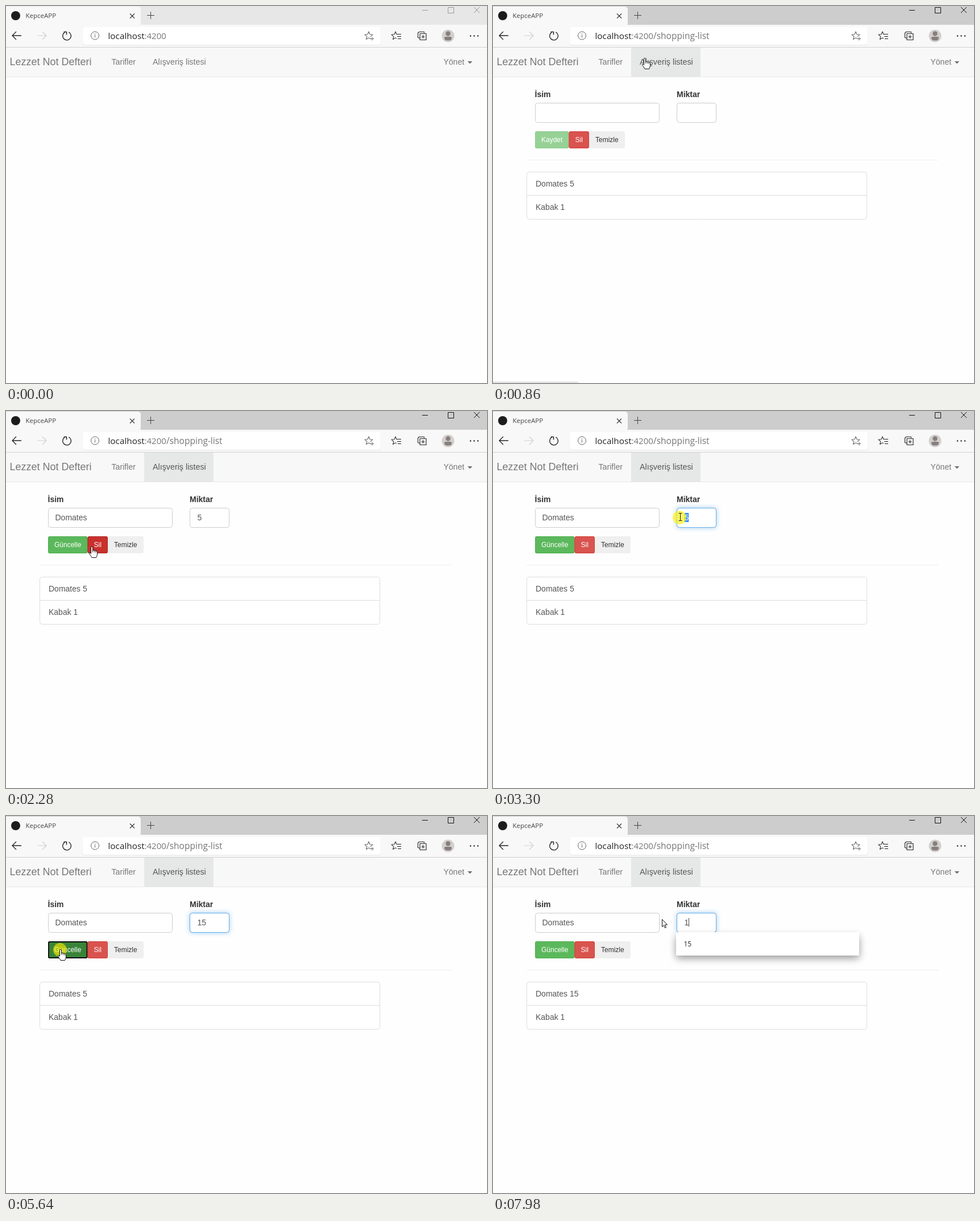
An HTML page with a canvas for the animation above (8000 ms loop, 846x662 px).

```html
<!DOCTYPE html>
<html lang="tr">
<head>
<meta charset="utf-8">
<title>KepceAPP</title>
<style>
html, body { margin: 0; width: 100%; height: 100%; overflow: hidden; background: #fefefe; }
canvas { display: block; }
</style>
</head>
<body>
<canvas id="stage" width="846" height="662"></canvas>
<script>
const c = document.getElementById('stage').getContext('2d');
const LOOP = 8000, TICK = 80;
const SANS = '"Liberation Sans", Arial, sans-serif';
const UI = '"Open Sans", "Noto Sans", sans-serif';

// Moments of the story, in ms
const ENTER = 70, NAV = 620, OPEN = 770, PICK = 2040, EDIT = 2120, FOCUS = 2930, TYPE1 = 4090,
  TYPE5 = 4230, SAVE = 5640, SAVED = 5720, REFOCUS = 7040, RETYPE = 7980;

// Pointer moves: start, end, x, y of the destination
const moves = [
  [ENTER, 390, 236, 84], [540, NAV, 267, 91], [950, 1330, 152, 236], [1420, 1570, 112, 336],
  [1570, 1720, 100, 302], [EDIT, 2200, 151, 238], [2360, 2840, 350, 183], [3090, 3390, 317, 187],
  [4720, 5320, 96, 234], [6420, 6740, 346, 183], [6890, 6890, 366, 183], [7120, 7350, 297, 181]
];
const presses = [[NAV, OPEN], [PICK, EDIT], [FOCUS, 3430], [SAVE, SAVED], [REFOCUS, 7300]];

const clamp = v => Math.max(0, Math.min(1, v));
const between = (t, a, b) => t >= a && t < b;

// The pointer advances once per tick while it moves.
function pointer(t) {
  let x = 690, y = 640;
  for (const [a, b, u, v] of moves) {
    if (t < a) break;
    const k = clamp((Math.floor((t - a) / TICK) + 1) * TICK / (b - a + TICK));
    x += (u - x) * k;
    y += (v - y) * k;
  }
  return { x: Math.round(x), y: Math.round(y) };
}

function text(s, x, y, color, size = 14, family = SANS, weight = '') {
  c.font = `${weight} ${size}px ${family}`;
  c.fillStyle = color;
  c.fillText(s, x, y);
}
function fill(color, x, y, w, h, r = 0) {
  c.fillStyle = color;
  c.beginPath();
  c.roundRect(x, y, w, h, r);
  c.fill();
}
// Border drawn just inside the box
function border(color, x, y, w, h, r = 0, lw = 1) {
  c.strokeStyle = color;
  c.lineWidth = lw;
  c.beginPath();
  c.roundRect(x + lw / 2, y + lw / 2, w - lw, h - lw, r);
  c.stroke();
}
function line(d, color, x = 0, y = 0, lw = 1, inside) {
  const p = new Path2D(d);
  c.save();
  c.translate(x, y);
  if (inside) { c.fillStyle = inside; c.fill(p); }
  c.strokeStyle = color;
  c.lineWidth = lw;
  c.lineJoin = 'round';
  c.stroke(p);
  c.restore();
}
function disc(color, x, y, r) {
  c.fillStyle = color;
  c.beginPath();
  c.arc(x, y, r, 0, 7);
  c.fill();
}
function star(x, y, r, color) {
  let d = '';
  for (let i = 0; i < 10; i++) {
    const a = i * Math.PI / 5, q = i % 2 ? r * .45 : r;
    d += (i ? 'L' : 'M') + q * Math.sin(a) + ' ' + -q * Math.cos(a);
  }
  line(d + 'Z', color, x, y, 1.1);
}

function browser(active, url) {
  fill(active ? '#cdcdcd' : '#e7e7e7', 0, 0, 846, 33);
  fill('#f8f8f8', 0, 33, 846, 39);
  fill('#f8f8f8', -8, 1, 245, 34, 5);
  fill('#d0d0d0', 0, 72, 846, 1);
  disc('#1c1c1c', 17, 17, 8);
  text('KepceAPP', 34.5, 21, '#444', 11.5, UI);
  line('M-4 -4l8 8m0 -8l-8 8', '#333', 222, 17.5, 1.1);
  line('M-6.5 0h13M0 -6.5v13', '#444', 254.5, 16.5);
  line('M732 7.5h10M777.5 2.5h10v10h-10zM823 2l10 10m0 -10l-10 10', active ? '#111' : '#999');

  line('M8 -7l-7 7 7 7M1 0h16', '#222', 10, 52, 1.3);
  line('M9 -7l7 7-7 7M16 0H0', '#d0d0d0', 55, 52, 1.2);
  line('M-4 -6.2A7.4 7.4 0 1 0 3.5 -6.6M-5.5 -7h5v5', '#222', 107, 52.5, 1.4);
  fill('#ececec', 134.5, 37.5, 525, 32, 4);
  fill('#fff', 135, 37, 524, 31, 4);
  line('M7 0A7 7 0 1 1 -7 0A7 7 0 1 1 7 0M0 -1.5v5M0 -4v1.4', '#666', 156.5, 52);
  text('localhost', 179.5, 58, '#222', 15.3, UI);
  text(':4200', 243.5, 58, '#757575', 15, UI);
  if (url) text(url, 282, 58, '#757575', 15.5, UI);

  star(638, 52.5, 7.5, '#666');
  fill('#fff', 641, 54, 7, 7);
  line('M0 -3v6M-3 0h6', '#666', 644, 57.5);
  star(685, 52.5, 7.5, '#333');
  fill('#f8f8f8', 687, 49, 8, 11);
  line('M0 0h8m-7 4h7m-6 4h6', '#222', 687, 49.5, 1.2);
  line('M3 11l-3 -1v-8l2 -2h9v2M3.5 3h11v11h-11zM9 5.5v6m-3 -3h6', '#222', 724.5, 45.5, 1.1);
  disc('#d2cfcd', 777.5, 52.5, 11);
  disc('#877f7e', 777.5, 48.5, 4.2);
  fill('#877f7e', 771, 54, 13, 6.5, [3, 3, 6, 6]);
  for (let i = 0; i < 3; i++) disc('#222', 817 + 6.5 * i, 52.5, 1.2);
}

function navbar(open, over) {
  fill('#f8f8f8', 0, 73, 846, 51);
  fill('#e7e7e7', 0, 124, 846, 1);
  if (open) fill('#e6e8e7', 243, 73, 122, 51);
  text('Lezzet Not Defteri', 6.5, 104, '#777', 18);
  text('Tarifler', 185.5, 103, over(171, 73, 72, 51) ? '#333' : '#777', 14.2);
  text('Alışveriş listesi', 258, 103, open ? '#555' : over(243, 73, 122, 51) ? '#333' : '#777', 14.3);
  text('Yönet', 769.5, 103, '#777');
  line('M0 0h7l-3.5 3.5z', '#777', 812.5, 97.5, 1, '#777');
}

function field(x, w, glow = 0) {
  c.save();
  c.shadowBlur = 8;
  c.shadowColor = `rgba(102,175,233,${.6 * glow})`;
  fill('#fff', x, 170, w, 35, 4);
  c.restore();
  border('#ccc', x, 170, w, 35, 4);
  c.globalAlpha = glow;
  border('#66afe9', x, 170, w, 35, 4);
  c.globalAlpha = 1;
}

function amount(t, at) {
  const left = 336.5, digit = 7.8;
  const focusedAt = t < SAVED ? FOCUS : REFOCUS;
  field(323, 70, t < focusedAt ? 0 : clamp((t - focusedAt + 60) / 150));
  if (t < EDIT) return;
  const value = t < TYPE1 ? '5' : t < TYPE5 || t >= RETYPE ? '1' : '15';
  const right = left + value.length * digit;
  text(value, left, 192, '#555');
  if (between(t, 3090, TYPE1) || between(t, 7120, RETYPE)) {
    const from = [...value].findIndex((_, i) => at.x < left + (i + .5) * digit);
    if (from < 0) return;
    const x = left + from * digit;
    fill('#3390ff', x, 179, right - x, 16);
    text(value.slice(from), x, 192, '#fff');
  } else if (between(t, FOCUS, 4720) || t >= REFOCUS) {
    fill('#444', Math.floor(right), 179, 1, 15);
  }
}

function button(label, x, w, color, edge, ink = '#fff') {
  fill(color, x, 220, w, 30, 3);
  border(edge, x, 220, w, 30, 3);
  text(label, x + 11, 239, ink, 12);
}

function form(t, over) {
  const editing = t >= EDIT;
  const split = editing ? 143.5 : 133.5, end = split + 35.5;
  const hot = (x, w) => over(x, 220, w, 30);
  const focused = between(t, SAVE, REFOCUS);
  if (!editing) button('Kaydet', 74, 59.5, '#96d196', '#8ccc8c');
  else if (between(t, SAVE, SAVED)) button('Güncelle', 74, 69.5, '#398439', '#255625');
  else if (focused || hot(74, 69)) button('Güncelle', 74, 69.5, '#449d44', '#398439');
  else button('Güncelle', 74, 69.5, '#5cb85c', '#4cae4c');
  if (focused) border('#111', 74, 220, 69.5, 30, 2, 2);
  if (hot(split, 35)) button('Sil', split, 35.5, '#c9302c', '#ac2925');
  else button('Sil', split, 35.5, '#d9534f', '#d43f3a');
  const gray = hot(end, 62) ? '#e5e5e5' : '#efefef';
  button('Temizle', end, 63, gray, gray, '#333');
}

function page(t, at, over) {
  text('İsim', 73.5, 160, '#333', 14, SANS, 'bold');
  text('Miktar', 323, 160, '#333', 14, SANS, 'bold');
  field(74, 219);
  if (t >= EDIT) text('Domates', 86.5, 192, '#555');
  amount(t, at);
  form(t, over);

  fill('#eee', 59, 270, 724, 1);
  fill('#fff', 59, 291, 599, 84, 4);
  border('#ddd', 59, 291, 599, 84, 4);
  fill('#ddd', 59, 332, 599, 1);
  text('Domates ' + (t < SAVED ? 5 : 15), 75, 317, '#555');
  text('Kabak 1', 75, 358, '#555');

  if (between(t, TYPE1, TYPE5) || t >= RETYPE) {
    c.save();
    c.shadowColor = 'rgba(0,0,0,.4)';
    c.shadowBlur = 14;
    c.shadowOffsetY = 5;
    fill('#fff', 322, 206, 322, 39, 3);
    c.restore();
    fill('#fff', 322, 204, 322, 41, 2);
    text('15', 335.5, 229, '#222', 12, UI);
  }
}

function cursor(t, at, over, open) {
  if (presses.some(([a, b]) => between(t, a, b))) disc('rgba(255,240,0,.62)', at.x - 1, at.y + 1, 12);
  const buttons = t >= EDIT ? over(74, 220, 168, 30) : over(133, 220, 98, 30);
  if (over(171, 73, 194, 51) || open && (buttons || over(59, 291, 598, 83))) {
    line('M-1.5 1.2Q0 -.8 1.5 1.2V7Q3 5.6 4.3 7.3Q6 6.3 7 8Q8.8 7 9.5 9.2V14Q9 17 7.5 19.5H0' +
      'Q-1.5 16.5 -4.2 12.8Q-5 10.5 -3.2 10.8L-1.5 12.3Z', '#111', at.x, at.y, 1, '#fff');
    line('M1.5 7v3M4.3 7.3v3M7 8v3', '#111', at.x, at.y, .8);
  } else if (open && (over(323, 170, 70, 35) || over(74, 170, 219, 35))) {
    line('M-3 -6.5H3M0 -6.5V6.5M-3 6.5H3', '#222', at.x + .5, at.y);
  } else {
    line('M0 0V13L3 10.3 5 15 7 14.2 5 9.5H9Z', '#111', at.x + .5, at.y + .5, 1, '#fff');
  }
}

function draw(t) {
  const at = pointer(t), open = t >= OPEN;
  const over = (x, y, w, h) => t >= ENTER && between(at.x, x, x + w) && between(at.y, y, y + h);
  fill('#fefefe', 0, 0, 846, 662);
  browser(t >= NAV, open && '/shopping-list');
  navbar(open, over);
  if (open) page(t, at, over);
  if (between(t, NAV, 1250)) {
    fill('#f3f3f3', -5, 660, 157, 10, 4);
    border('#ccc', -5, 660, 157, 10, 4);
  }
  if (t >= ENTER) cursor(t, at, over, open);
}

const start = performance.now();
function tick() {
  draw((performance.now() - start) % LOOP);
  requestAnimationFrame(tick);
}
tick();
</script>
</body>
</html>
```
